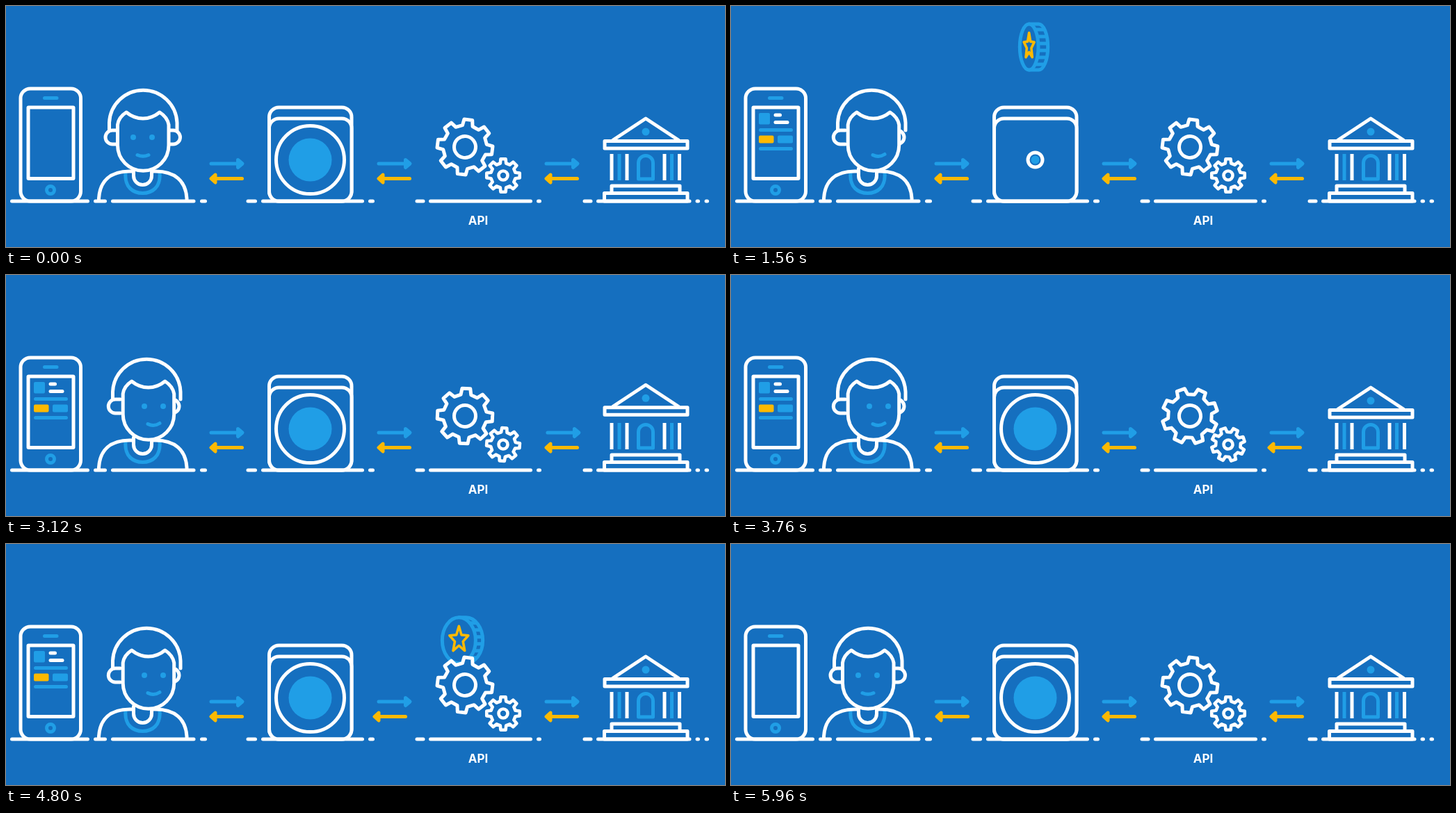
Write an HTML page that moves like this. It is 1034 px wide and 347 px high and loops after 6000 ms.

```html
<!DOCTYPE html>
<html lang="en">
<head>
<meta charset="utf-8">
<title>Payment flow</title>
<style>
  html, body { margin: 0; width: 100%; height: 100%; overflow: hidden; background: #156fbf; }
  svg { display: block; width: 100%; height: 100%; }
  svg * { stroke-linecap: round; stroke-linejoin: round; }
  .w, .l, .y { fill: none; stroke-width: 5; }
  .w { stroke: #fff; }
  .l { stroke: #209ee6; }
  .y { stroke: #fdb900; }
  .bg { fill: #156fbf; }
  .fl { fill: #209ee6; }
  .fy { fill: #fdb900; }
  .star { stroke-width: 3.6; }
  .flat { stroke-linecap: butt; }
  text { font: 700 17px Inter, Roboto, sans-serif; fill: #fff; text-anchor: middle; }
</style>
</head>
<body>
<svg viewBox="0 0 1034 347">
  <!-- phone -->
  <rect class="w" x="21" y="119" width="86.5" height="162" rx="14"/>
  <path class="l" d="M55.500 132.500H73"/>
  <rect class="w" x="32" y="146" width="65" height="102.500" rx=".5"/>
  <circle class="l" cx="64" cy="265" r="5.5"/>
  <g id="screen">
    <rect class="fl" x="40" y="154" width="16" height="16.500" rx="2"/>
    <path class="w" d="M64 157H70.500"/>
    <path class="w" d="M64 167.500H81"/>
    <path class="l" d="M42.500 178.500H86.500"/>
    <rect class="fy" x="40" y="186.500" width="21.500" height="11" rx="2"/>
    <rect class="fl" x="67" y="186.500" width="22" height="11" rx="2"/>
    <path class="l" d="M42.500 205.500H86.500"/>
  </g>

  <!-- customer -->
  <path class="l" d="M172 240C170 261 183 269.500 196.500 269.500C210 269.500 223 261 221 240"/>
  <path class="w" d="M133.500 280V277C135 252 150 238 178 238H183.500M260 280V277C258.500 252 243 238 215 238H209.500"/>
  <path class="w" d="M183.500 234V244.500a13 13 0 0 0 26 0V234"/>
  <path id="earR" class="w bg" d="M234 179H240a10 10 0 0 1 0 20H234"/>
  <path id="hair" class="w" d="M148.500 179V168A48.800 49 0 0 1 246 168V179"/>
  <path id="earL" class="w bg" d="M160 179H153a10 10 0 0 0 0 20H160"/>
  <path id="face" class="w bg" d="M160.500 171V200.500A36.700 36.700 0 0 0 234 200.500V171Q232 160 221 153Q210 162 197 162Q184 162 173 153Q162 160 160.500 171Z"/>
  <ellipse id="eyeL" class="fl" cy="189" rx="4"/>
  <ellipse id="eyeR" class="fl" cy="189" rx="4"/>
  <path id="mouth" class="l"/>

  <!-- app -->
  <g id="coinA"></g>
  <rect class="w bg" x="378.500" y="146" width="118.500" height="135" rx="14"/>
  <rect class="w bg" x="378.500" y="162" width="118.500" height="119" rx="14"/>
  <circle id="ring" class="w" cx="437.500" cy="221.500"/>
  <circle id="disc" class="fl" cx="437.500" cy="221.500"/>

  <!-- API -->
  <g id="coinB"></g>
  <g id="gearBig"></g>
  <g id="gearSmall"></g>
  <text x="679" y="314.500">API</text>

  <!-- bank -->
  <g class="flat">
    <path class="w flat" d="M871 213V251M893 213V251M947 213V251M968.500 213V251"/>
    <path class="l flat" d="M882 213V251M957.500 213V251"/>
  </g>
  <path class="l" d="M909.500 249V226a10.500 10.500 0 0 1 21 0V249Z"/>
  <rect class="w" x="871" y="259" width="98" height="10.500"/>
  <rect class="w" x="860.500" y="269.500" width="119.500" height="11.500"/>
  <g id="roof">
    <path class="w" d="M873 193L920 162L967 193"/>
    <rect class="w bg" x="861" y="194.500" width="119" height="10.500"/>
    <circle class="fl" cx="920" cy="181" r="5.500"/>
  </g>

  <path class="w" d="M8.500 281H117.500M128.500 281H142.500M153.500 281H270M281.500 281H286.500
    M348 281H358.500M369.500 281H512.500M523.500 281H527.500
    M591 281H600M610.500 281H754.500M765.500 281H767.500
    M832 281H841M851.500 281H983M994 281H995.500M1007 281H1008.500"/>
  <g id="arrows"></g>
</svg>

<script>
const LOOP = 6000;
const $ = id => document.getElementById(id);
const clamp = x => Math.min(1, Math.max(0, x));
const mix = (a, b, q) => a + (b - a) * q;
const smooth = x => { x = clamp(x); return x * x * (3 - 2 * x); };
const ease = (t, from, to) => smooth((t - from) / (to - from));
const between = (t, a, b, c, d) => ease(t, a, b) - ease(t, c, d);
const shift = (id, x, y = 0) => $(id).setAttribute('transform', `translate(${x} ${y})`);

function set(id, attrs) {
  for (const key in attrs) $(id).setAttribute(key, attrs[key]);
}

function polar(r, deg) {
  const a = deg * Math.PI / 180;
  return [r * Math.sin(a), -r * Math.cos(a)];
}

function polygon(points) {
  return 'M' + points.map(p => p.map(v => v.toFixed(2)).join(' ')).join('L') + 'Z';
}

function makeGear(id, tip, root, hole, width) {
  const points = [];
  for (let k = 0; k < 8; k++) {
    for (const [r, a] of [[root, -13.5], [tip, -8.5], [tip, 8.5], [root, 13.5]]) {
      points.push(polar(r, k * 45 + a));
    }
  }
  $(id).innerHTML = `<path class="w bg" style="stroke-width:${width}" d="${polygon(points)}"/>
    <circle class="w" style="stroke-width:${width}" r="${hole}"/>`;
}

// The arrow swings out, overshoots on the way back and settles.
function kick(t, start) {
  const u = (t - start) / 800;
  if (u <= 0 || u >= 1) return 0;
  if (u < .3) return 6 * smooth(u / .3);
  if (u < .8) return mix(6, -2.2, smooth((u - .3) / .5));
  return mix(-2.2, 0, smooth((u - .8) / .2));
}

const arrows = [
  { x: 0, go: 400, back: 5240 },
  { x: 241, go: 1960, back: 4560 },
  { x: 482, go: 2680, back: 3640 }
];

function drawArrows(t) {
  $('arrows').innerHTML = arrows.map(({ x, go, back }) => `
    <g transform="translate(${x + kick(t, go)} 0)">
      <path class="l" d="M295 227H338"/>
      <path class="l fl" d="M333.500 221.500L340 227L333.500 232.500Z"/>
    </g>
    <g transform="translate(${x - kick(t, back)} 0)">
      <path class="y" d="M297 248.500H339.500"/>
      <path class="y fy" d="M301 243L295 248.500L301 254Z"/>
    </g>`).join('');
}

function coinMarkup(x, y, deg) {
  const R = 33, depth = 15;
  let c = Math.cos(deg * Math.PI / 180), s = Math.sin(deg * Math.PI / 180);
  if (c < 0) { c = -c; s = -s; }
  const rx = Math.max(R * c, .5);
  const front = s * depth / 2, back = -front;
  const side = back > front ? 1 : -1;
  let ridges = '';
  for (let h = -25; h <= 25; h += 10) {
    const edge = side * rx * Math.sqrt(1 - h * h / R / R);
    ridges += `M${front + edge} ${h}H${back + edge}`;
  }
  const star = [];
  for (let k = 0; k < 10; k++) {
    const [px, py] = polar(k % 2 ? 8.5 : 19.5, k * 36);
    star.push([front + px * c, py - 1]);
  }
  return `<g transform="translate(${x} ${y})">
    <path class="l bg" d="M${front} ${-R}H${back}A${rx} ${R} 0 0 ${side > 0 ? 1 : 0} ${back} ${R}H${front}"/>
    <path class="l flat" d="${ridges}"/>
    <ellipse class="l bg" cx="${front}" rx="${rx}" ry="${R}"/>
    <path class="y star" d="${polygon(star)}"/>
  </g>`;
}

function toss(t, start, length, x, base, height) {
  const p = (t - start) / length;
  if (p <= 0 || p >= 1) return '';
  return coinMarkup(x, base - height * 4 * p * (1 - p), 105 - 376 * p);
}

function drawScreen(t) {
  [...$('screen').children].forEach((part, k) => {
    const q = between(t, 130 + k * 50, 330 + k * 50, 5820 - k * 45, 5950 - k * 45);
    const x = part.getBBox().x;
    part.setAttribute('transform', `translate(${x} 0) scale(${q} 1) translate(${-x} 0)`);
    part.style.display = q > .01 ? '' : 'none';
  });
}

function drawHead(t) {
  const q = between(t, 200, 820, 5380, 5830);
  const eye = 4 * (1 - between(t, 1440, 1530, 1600, 1690));
  shift('hair', 5 * q);
  shift('face', 7.7 * q);
  shift('earL', 4.3 * q);
  shift('earR', .5 - 1.5 * q);
  set('eyeL', { cx: mix(183, 199, q), ry: eye });
  set('eyeR', { cx: mix(210, 226, q), ry: eye });
  const left = mix(189, 204, q), right = mix(205, 221, q);
  set('mouth', {
    d: `M${left} 214.500Q${(left + right) / 2} ${mix(218, 219, q)} ${right} ${mix(214.5, 213.5, q)}`
  });
}

function draw(t) {
  drawScreen(t);
  drawHead(t);
  drawArrows(t);

  const small = between(t, 950, 1200, 1800, 2000) + between(t, 4960, 5220, 5650, 5850);
  set('ring', { r: mix(49, 10.5, small) });
  set('disc', { r: mix(31, 6, small) });
  $('coinA').innerHTML = toss(t, 1255, 670, 435.5, 185, 127) + toss(t, 5260, 500, 435.5, 185, 60);
  $('coinB').innerHTML = toss(t, 4215, 670, 656.5, 203, 145);

  const turn = 90 * clamp((t - 1980) / 2520);
  set('gearBig', { transform: `translate(660 203) rotate(${7 + turn})` });
  set('gearSmall', { transform: `translate(715 244) rotate(${-turn})` });

  shift('roof', 0, -12 * between(t, 3020, 3290, 3310, 3620));
}

makeGear('gearBig', 40, 31.5, 15.5, 5);
makeGear('gearSmall', 24, 18, 6.5, 4.6);

let begin;
function tick(now) {
  begin ??= now;
  draw((now - begin) % LOOP);
  requestAnimationFrame(tick);
}
draw(0);
requestAnimationFrame(tick);
</script>
</body>
</html>
```
